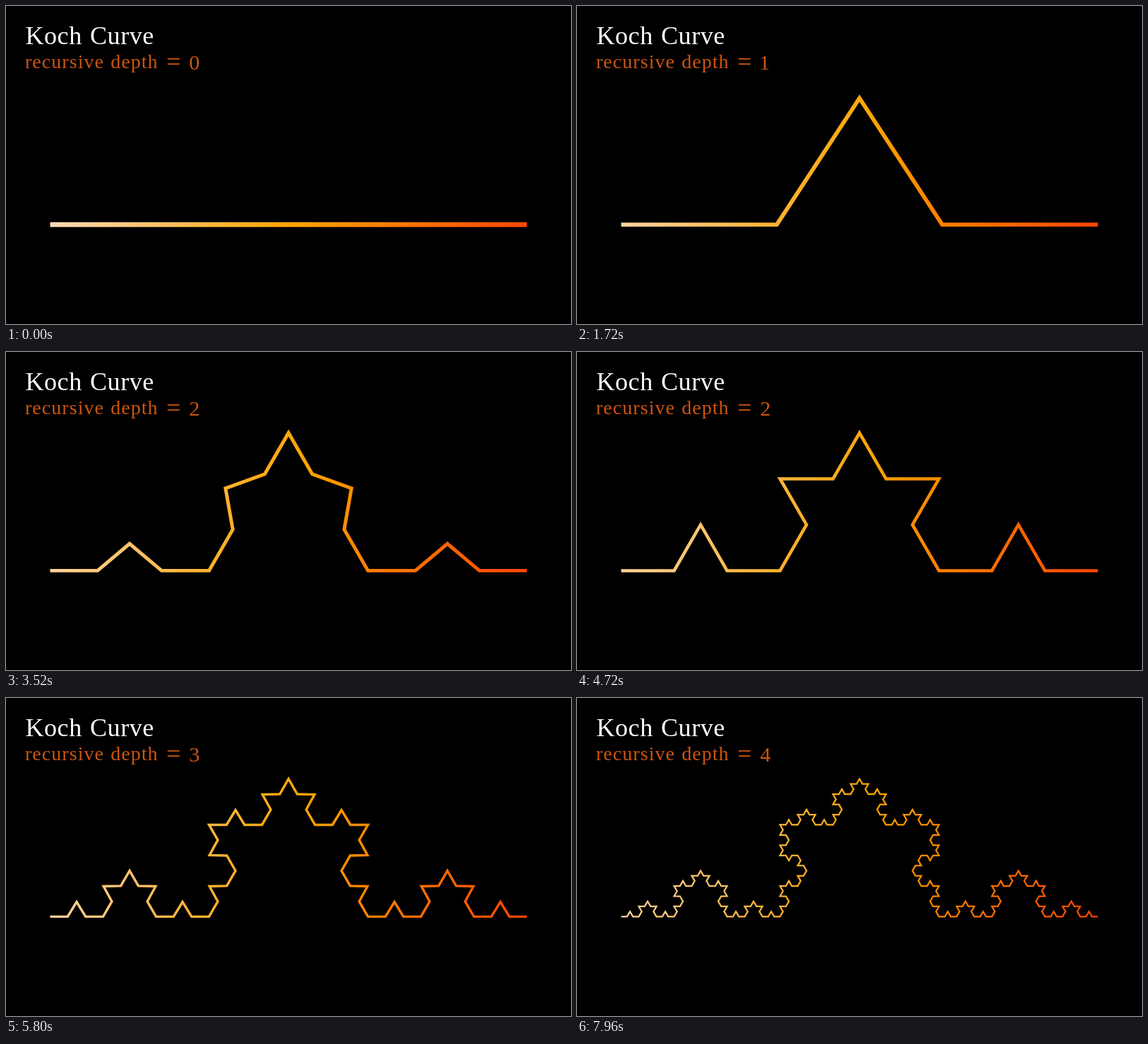
Animation, 800 px wide and 450 px high, one loop 8 s. Source, as an HTML page with a canvas:

```html
<!DOCTYPE html>
<html lang="en">
<head>
<meta charset="utf-8">
<title>Koch Curve</title>
<style>
  html, body { margin: 0; height: 100%; overflow: hidden; background: #000; }
  canvas { display: block; }
</style>
</head>
<body>
<canvas id="stage" width="800" height="450"></canvas>
<script>
const ctx = document.getElementById('stage').getContext('2d');
const LOOP = 8000, PERIOD = 2000, FIRST = 987, RUN = 1000;
const LEFT = 62.5, RIGHT = 737.5, BASE = 309.375, UNIT = 0.5625;

const sigmoid = x => 1 / (1 + Math.exp(-x));

// Normalised sigmoid easing from 0 to 1
function smooth(t) {
  const edge = sigmoid(-5);
  const v = (sigmoid(10 * (t - 0.5)) - edge) / (1 - 2 * edge);
  return Math.min(1, Math.max(0, v));
}

// Splits each segment in four; k = 0 keeps it straight, k = 1 raises a full Koch peak
function subdivide(points, k) {
  const f = 1 / 4 + k / 12, h = k * Math.sqrt(3) / 6;
  const out = [points[0]];
  for (let i = 1; i < points.length; i++) {
    const [x, y] = points[i - 1], [u, v] = points[i];
    const dx = u - x, dy = v - y;
    out.push(
      [x + dx * f, y + dy * f],
      [x + dx / 2 + dy * h, y + dy / 2 - dx * h],
      [u - dx * f, v - dy * f],
      [u, v]
    );
  }
  return out;
}

function drawCurve(level, k) {
  let points = [[LEFT, BASE], [RIGHT, BASE]];
  for (let i = 0; i < level; i++) points = subdivide(points, 1);
  points = subdivide(points, k);

  // The gradient runs along the diagonal of the bounding box
  const top = Math.min(...points.map(p => p[1]));
  const paint = ctx.createLinearGradient(RIGHT, BASE, LEFT, top);
  ['#ff4500', '#ffa500', '#ffdab9'].forEach((c, i) => paint.addColorStop(i / 2, c));

  ctx.strokeStyle = paint;
  ctx.lineWidth = (12 - 2 * (level + k)) * UNIT;
  ctx.beginPath();
  points.forEach(p => ctx.lineTo(...p));
  ctx.stroke();
}

function write(text, x, y, size, color, letterGap = 0, wordGap = 0) {
  ctx.font = `${size}px "Liberation Serif", serif`;
  ctx.letterSpacing = letterGap + 'px';
  ctx.wordSpacing = wordGap + 'px';
  ctx.fillStyle = color;
  ctx.fillText(text, x, y);
}

function draw(time) {
  const t = time % LOOP;
  const level = Math.min(3, Math.max(0, Math.floor((t - FIRST) / PERIOD)));
  const progress = (t - FIRST - level * PERIOD) / RUN;
  const k = smooth(Math.min(1, Math.max(0, progress)));
  const depth = Math.round(level + k);
  const accent = '#cc5510';

  ctx.fillStyle = '#000';
  ctx.fillRect(0, 0, 800, 450);
  write('Koch Curve', 27.5, 53.5, 36, '#fff', 0.55, 1.8);
  write('recursive depth', 27, 87.5, 28, accent, 1.04, 1.2);
  write('=', 227, 91, 36, accent);
  write(depth, depth === 1 ? 258 : 259.2, 90, 30, accent);
  drawCurve(level, k);
}

const start = performance.now();
function frame() {
  draw(performance.now() - start);
  requestAnimationFrame(frame);
}
frame();
</script>
</body>
</html>
```
